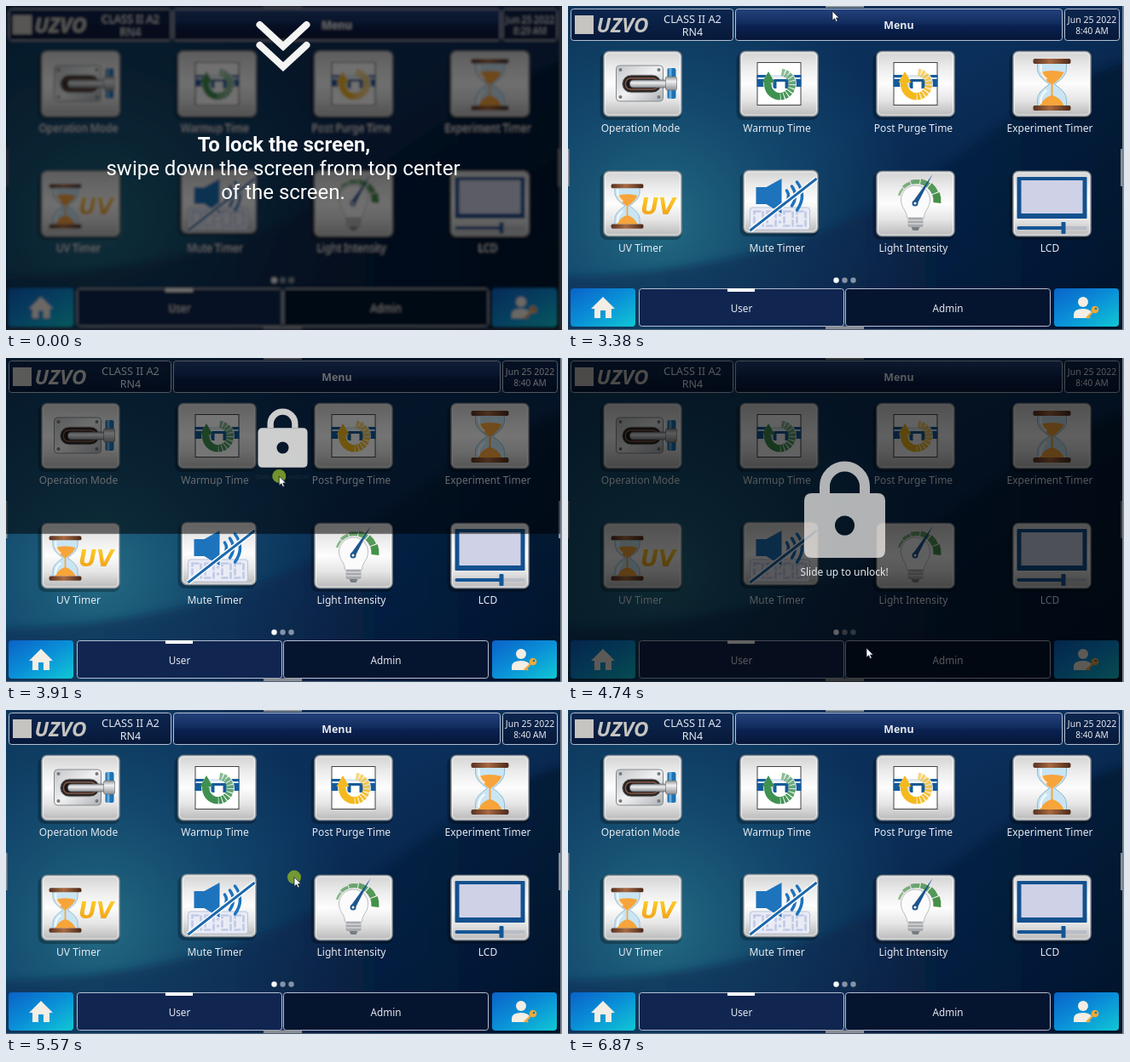
Animation, 652 px wide and 381 px high, one loop 7.26 s. Source, as an HTML page:

```html
<!DOCTYPE html>
<html lang="en">
<head>
<meta charset="utf-8">
<title>Lock screen walkthrough</title>
<style>
html, body { margin: 0; width: 100%; height: 100%; overflow: hidden; background: #020b1e; }
svg { display: block; width: 100vw; height: 100vh; }
text { font-family: "Noto Sans", "Open Sans", sans-serif; fill: #e6eaf0; text-anchor: middle; }
.hint text { font-family: Roboto, Inter, sans-serif; font-size: 24px; fill: #fff; }
</style>
</head>
<body>
<svg id="stage" viewBox="0 0 652 381" preserveAspectRatio="none"></svg>
<script>
const LOOP = 7260, INTRO = 2500, W = 652, H = 381;
const stage = document.getElementById('stage');

// Markup helpers
const rect = (x, y, w, h, fill, more = '') =>
  `<rect x="${x}" y="${y}" width="${w}" height="${h}" fill="${fill}" ${more}/>`;
const circle = (x, y, r, fill, more = '') => `<circle cx="${x}" cy="${y}" r="${r}" fill="${fill}" ${more}/>`;
const path = (d, fill, more = '') => `<path d="${d}" fill="${fill}" ${more}/>`;
const line = (d, color, w, more = '') => path(d, 'none', `stroke="${color}" stroke-width="${w}" ${more}`);
const text = (x, y, size, s, more = '') => `<text x="${x}" y="${y}" font-size="${size}" ${more}>${s}</text>`;
const at = (x, y, body) => `<g transform="translate(${x} ${y})">${body}</g>`;
const range = (n, f) => Array.from({ length: n }, (_, i) => f(i)).join('');
const gradient = (id, dir, ...stops) =>
  `<linearGradient id="${id}" x1="0" y1="0" x2="${dir === 'v' ? 0 : 1}" y2="${dir === 'h' ? 0 : 1}">` +
  stops.map(([o, c]) => `<stop offset="${o}" stop-color="${c}"/>`).join('') + '</linearGradient>';
const panel = (x, y, w, h, fill) =>
  rect(x + .5, y + .5, w - 1, h - 1, fill, 'rx="3" stroke="#b3bfd2"');

function ringSector(cx, cy, r0, r1, a0, a1) {
  const p = (r, a) => `${(cx + r * Math.cos(a)).toFixed(1)} ${(cy + r * Math.sin(a)).toFixed(1)}`;
  const big = a1 - a0 > Math.PI ? 1 : 0;
  return `M${p(r0, a0)}L${p(r1, a0)}A${r1} ${r1} 0 ${big} 1 ${p(r1, a1)}L${p(r0, a1)}A${r0} ${r0} 0 ${big} 0 ${p(r0, a0)}Z`;
}

// Icons, each drawn in a 92 x 77 tile
const latch =
  rect(15, 17, 55, 42, 'url(#plate)', 'rx="4" stroke="#85888c"') +
  [[20, 22], [65, 22], [20, 54], [65, 54]].map(([x, y]) => circle(x, y, 2, '#74777b')).join('') +
  rect(22, 28, 46, 21, '#2b2727', 'rx="10.5" stroke="#b9bbbe"') +
  rect(26, 32, 38, 13, '#17171a', 'rx="6" stroke="#8a5a45" stroke-width="1.4"') +
  rect(31, 34, 45, 9, 'url(#steel)', 'rx="4" stroke="#606468" stroke-width=".7"') +
  rect(75, 20, 10, 36, '#1d72b4', 'rx="2"') + rect(77, 20, 3, 36, '#69add9') +
  rect(73, 30, 13, 16, 'url(#steel)', 'rx="2" stroke="#666" stroke-width=".6"');

const purge = color =>
  rect(20.5, 13.5, 51, 50, '#fff', 'stroke="#3e4347"') +
  rect(20, 28, 52, 14, '#145b9c') + rect(21, 31, 50, 2, '#d9e8f5') +
  circle(47, 39, 19.5, '#fff', 'fill-opacity=".85"') +
  rect(39, 33, 18, 11, '#145b9c', 'rx="2"') + rect(43, 36, 10, 8, '#fff') +
  path(ringSector(47, 39, 10, 18.5, 1.55, 3.3), color) +
  path('M26 37L33.5 24L41 37Z', color) +
  range(10, i => {
    const a = 1.5 - i * .3;
    return path(ringSector(47, 39, 10, 18.5, a - .23, a), color, `opacity="${1 - i * .045}"`);
  });

const hourglass = (x, y, s) => `<g transform="translate(${x} ${y}) scale(${s})">` +
  path('M-17 -26H17V-18Q17 -9 3 0Q17 9 17 18V26H-17V18Q-17 9 -3 0Q-17 -9 -17 -18Z', '#c9e5f4', 'stroke="#8db9d1"') +
  path('M-14 -14Q0 -18 14 -14Q11 -7 1 0V13Q10 16 14 25H-14Q-10 16 -1 13V0Q-11 -7 -14 -14Z', '#f7a43a') +
  line('M-13 -23V-17Q-12 -10 -6 -6M-13 23V18Q-12 11 -6 7', '#fff', 2.4, 'opacity=".8"') +
  [-30, 25].map(v => rect(-22, v, 44, 6, 'url(#wood)', 'rx="2"')).join('') + '</g>';

const uv = hourglass(28, 41, .86) +
  text(64, 51, 26, 'UV', 'style="font-family:\'DejaVu Sans\',sans-serif;font-weight:700;font-style:oblique;fill:url(#gold)"');

const mute =
  rect(8, 44, 70, 26, '#e9ecf5', 'rx="3" stroke="#b9c2de"') +
  [13, 28, 48, 63].map(x => rect(x, 48.5, 10, 17, 'none', 'stroke="#c1c9e6" stroke-width="2.6" stroke-dasharray="8 2"')).join('') +
  circle(43, 53, 1.7, '#c1c9e6') + circle(43, 61, 1.7, '#c1c9e6') +
  path('M15 20H27L45 10V51L27 40H15Z', '#1d73bc') +
  line('M51 24Q55 30 51 37M57 19Q65 30 57 42M63 14Q75 30 63 47', '#1d73bc', 3.5, 'stroke-linecap="round"') +
  line('M8 71L86 10', '#fff', 6) + line('M8 71L86 10', '#1d68aa', 3);

const bulb =
  range(6, i => {
    const a = -2.85 + i * .5;
    return path(ringSector(47, 35, 20, 22.5 + i * 1.3, a, a + .45), '#459149', `opacity="${.6 + i * .08}"`);
  }) +
  path('M36 55C36 46 29 44 29 34A17 17 0 0 1 63 34C63 44 56 46 56 55Z', '#fbfbfb', 'stroke="#b9bcc0"') +
  rect(37, 55, 18, 11, '#a6a9ad', 'rx="2"') + line('M37 58H55M37 62H55', '#ececec', 1.2) +
  path('M41 66H51L49 70H43Z', '#777b80') +
  path('M43 36L66 4L48 39Z', '#1c568f') + circle(45.5, 38, 3.5, '#1c568f') + circle(45.5, 38, 1.5, '#fff');

const lcd =
  rect(5, 7, 82, 49, '#13508f', 'rx="1"') + rect(10, 11, 72, 39, '#cfd2e6') +
  rect(5, 65, 82, 4, '#b8bdc7', 'rx="2"') + rect(5, 65, 56, 4, '#145596', 'rx="2"') +
  rect(57, 60, 5, 14, '#145596', 'rx="1"');

// name, icon, left, top, width, height
const tiles = [
  ['Operation Mode', latch], ['Warmup Time', purge('#3f9150')],
  ['Post Purge Time', purge('#f4b91f')], ['Experiment Timer', hourglass(46, 39, 1)],
  ['UV Timer', uv], ['Mute Timer', mute, 205.5, 193, 88, 74], ['Light Intensity', bulb], ['LCD', lcd]
].map(([name, icon, x, y, w = 92, h = 77], i) => {
  const left = 41.5 + i % 4 * 160, top = i < 4 ? 53 : 194;
  return at(x ?? left, y ?? top,
    rect(-4, 2, w + 4, h + 2, '#000', 'rx="8" opacity=".28"') +
    rect(.5, .5, w - 1, h - 1, 'url(#tile)', 'rx="6" stroke="#8f949a" stroke-width="1.4"') +
    rect(2, 2, w - 4, h - 4, 'none', 'rx="5" stroke="#fff" opacity=".65"') + icon) +
    text(left + 43.5, i < 4 ? 147.5 : 289, 12, name);
}).join('');

const defs = '<defs>' +
  gradient('sky', 'd', [0, '#0b3157'], [.45, '#0a2f5a'], [1, '#04122e']) +
  gradient('deep', 'h', [0, '#073056'], [.45, '#08284f'], [1, '#041127']) +
  gradient('bar', 'v', [0, '#24427b'], [.45, '#112c5f'], [.55, '#0a2150'], [1, '#071638']) +
  gradient('side', 'v', [0, '#0c264f'], [1, '#07193a']) +
  gradient('action', 'd', [0, '#0a62c8'], [.5, '#0a90d8'], [1, '#10c8d4']) +
  gradient('tile', 'v', [0, '#d3d3d3'], [.25, '#ececec'], [.5, '#fdfdfd'], [.75, '#e5e5e5'], [1, '#b8b8b8']) +
  gradient('plate', 'd', [0, '#c3c6c9'], [.5, '#f0f1f2'], [1, '#aeb1b5']) +
  gradient('steel', 'v', [0, '#8f9397'], [.35, '#f0f1f2'], [1, '#8d9195']) +
  gradient('wood', 'h', [0, '#593120'], [.45, '#a86a42'], [1, '#4c2919']) +
  gradient('gold', 'v', [0, '#ffd427'], [1, '#ee9818']) +
  `<radialGradient id="glow" gradientUnits="userSpaceOnUse" cx="110" cy="255" r="300">
    <stop offset="0" stop-color="#2a7a8c" stop-opacity=".8"/>
    <stop offset=".5" stop-color="#1d6483" stop-opacity=".45"/>
    <stop offset="1" stop-color="#1b5f80" stop-opacity="0"/></radialGradient>
  <filter id="soft"><feGaussianBlur stdDeviation="4"/></filter>
  <filter id="blur" x="0" y="0" width="1" height="1"><feGaussianBlur stdDeviation="1.7"/></filter></defs>`;

const backdrop = rect(0, 0, W, H, 'url(#sky)') + rect(0, 0, W, H, 'url(#glow)') +
  path('M-20 318C190 316 330 265 430 195S580 85 672 60V401H-20Z', 'url(#deep)', 'opacity=".6" filter="url(#soft)"');

const header = panel(3, 3, 191, 38, 'url(#side)') + panel(196, 3, 384, 38, 'url(#bar)') +
  panel(582, 3, 65, 38, 'url(#side)') +
  rect(8, 11, 22, 22, '#c6c4c0') +
  text(64, 31, 24, 'UZVO', 'style="font-weight:800;font-style:italic;fill:#c6c4c0"') +
  text(146, 20, 12.8, 'CLASS II A2') + text(146, 35, 12.5, 'RN4') +
  text(388, 27, 12.4, 'Menu', 'font-weight="700"') +
  text(614.5, 20, 10.5, 'Jun 25 2022') + text(614.5, 33, 10.2, '8:40 AM', 'id="clock"');

const footer =
  [315, 325, 335].map((x, i) => circle(x - .5, 322.5, 3.2, i ? '#8494a6' : '#fff')).join('') +
  rect(3, 332, 76, 45, 'url(#action)', 'rx="4"') + rect(570, 332, 76, 45, 'url(#action)', 'rx="4"') +
  panel(83, 332, 241, 45, '#102650') + panel(325, 332, 241, 45, '#05142f') +
  rect(187, 332, 32, 4, '#fff') + text(203.5, 360, 11.7, 'User') + text(445.5, 360, 11.7, 'Admin') +
  path('M27 356L41 342L55 356H51V367H44V358H38V367H31V356Z', '#f4eee4') +
  circle(604, 348, 6, '#f4eee4') + path('M593 367V363Q593 356 604 356Q611 356 614 360L609 367Z', '#f4eee4') +
  circle(618, 357, 4.3, '#f2a93b') + line('M615 360L608 367M610 365L612 367', '#f2a93b', 2.4) +
  circle(619, 356, 1.3, '#0b7c9b');

const handles = rect(302, 0, 45, 2, '#8b9097') + rect(302, 376.5, 45, 3.5, '#8b9097') +
  rect(0, 168, 1.5, 44, '#8b9097') + rect(648, 168, 2, 44, '#8b9097') +
  rect(650, 0, 2, H, '#7f8790') + rect(0, 380, W, 1, '#7f8790', 'opacity=".6"');

const hint = `<g id="hint" class="hint">${rect(0, 0, W, H, '#000', 'opacity=".56"')}` +
  [0, 24].map(y => line(`M297.5 ${22 + y}L325 ${47.5 + y}L352.5 ${22 + y}`, '#f4f4f4', 8, 'stroke-linecap="round"')).join('') +
  text(326, 171, 24, 'To lock the screen,', 'font-weight="700"') +
  text(325, 199, 24, 'swipe down the screen from top center') +
  text(325, 227, 24, 'of the screen.') + '</g>';

// The padlock is drawn around the middle of the shade
const lock = `<g id="shade">${rect(0, 0, 650, H, '#000', 'id="veil"')}<g id="lock"><g id="padlock">` +
  path('M-38.5 -31H38.5Q47.5 -31 47.5 -22V36Q47.5 45 38.5 45H-38.5Q-47.5 45 -47.5 36V-22Q-47.5 -31 -38.5 -31Z' +
    'M-11.5 7A11.5 11.5 0 0 0 11.5 7A11.5 11.5 0 0 0 -11.5 7Z', '#fbf7f3', 'fill-rule="evenodd"') +
  line('M-23.5 -31V-39A23.5 23.5 0 0 1 23.5 -39V-31', '#fbf7f3', 12) + '</g>' +
  text(-.5, 66, 12, 'Slide up to unlock!', 'id="unlock"') + '</g></g>';

const pointer = `<g id="pointer">${circle(0, 0, 8, '#86a92c', 'id="touch" opacity=".85"')}` +
  path('M0 0V11L2.6 8.7L4.4 12.5L6.2 11.7L4.5 8H8Z', '#fff', 'stroke="#15202c" stroke-width=".8"') + '</g>';

stage.innerHTML = defs + `<g id="ui">${backdrop + header + tiles + footer + handles}</g>` + lock + hint + pointer;

const $ = id => document.getElementById(id);
const [ui, clock, hintBox, shade, veil, lockBox, padlock, unlock, mouse, touch] =
  ['ui', 'clock', 'hint', 'shade', 'veil', 'lock', 'padlock', 'unlock', 'pointer', 'touch'].map($);
const show = (el, on) => el.setAttribute('display', on ? 'inline' : 'none');
const clamp = v => Math.max(0, Math.min(1, v));
const smooth = v => v * v * (3 - 2 * v);

// time, x, y
const route = [
  [2500, 565, 340], [3220, 310, 6], [3400, 310, 6], [3830, 318.5, 102], [3990, 322, 175],
  [4210, 328, 215], [4360, 330, 225], [4740, 350, 341], [5040, 351, 352], [5260, 350, 348],
  [5570, 338, 197], [5870, 332, 75], [6040, 332, 75], [6790, 648, 381]
];

function pointerAt(t) {
  const i = Math.max(1, route.findIndex(k => k[0] > t));
  const [t0, x0, y0] = route[i - 1], [t1, x1, y1] = route[i];
  const k = clamp((t - t0) / (t1 - t0));
  return [x0 + (x1 - x0) * k, y0 + (y1 - y0) * k];
}

// Share of the screen covered: a slow pull, a snap open, a swipe away
const PULL = .068;
function shadeAt(t) {
  if (t < 3830) return PULL * clamp((t - 3450) / 380);
  if (t < 5260) return PULL + (1 - PULL) * smooth(clamp((t - 3830) / 160));
  return 1 - smooth(clamp((t - 5260) / 270));
}

function render(t) {
  const intro = t < INTRO;
  show(hintBox, intro);
  ui.setAttribute('filter', intro ? 'url(#blur)' : 'none');
  clock.textContent = intro ? '8:29 AM' : '8:40 AM';

  const p = shadeAt(t);
  show(shade, !intro && p > 0);
  veil.setAttribute('height', p * H);
  veil.setAttribute('opacity', .45 + .17 * p);
  lockBox.setAttribute('transform', `translate(324.5 ${194 * p - 4}) scale(${.15 + .85 * p})`);
  padlock.setAttribute('opacity', .95 - .25 * p);
  unlock.setAttribute('opacity', clamp(p * 2 - 1));

  const moving = !intro && t < 6790;
  show(mouse, moving);
  if (moving) mouse.setAttribute('transform', `translate(${pointerAt(t).map(v => v.toFixed(2)).join(' ')})`);
  show(touch, (t > 3420 && t < 3990) || (t > 5230 && t < 5870));
}

const start = performance.now();
function tick() {
  render((performance.now() - start) % LOOP);
  requestAnimationFrame(tick);
}
tick();
</script>
</body>
</html>
```
